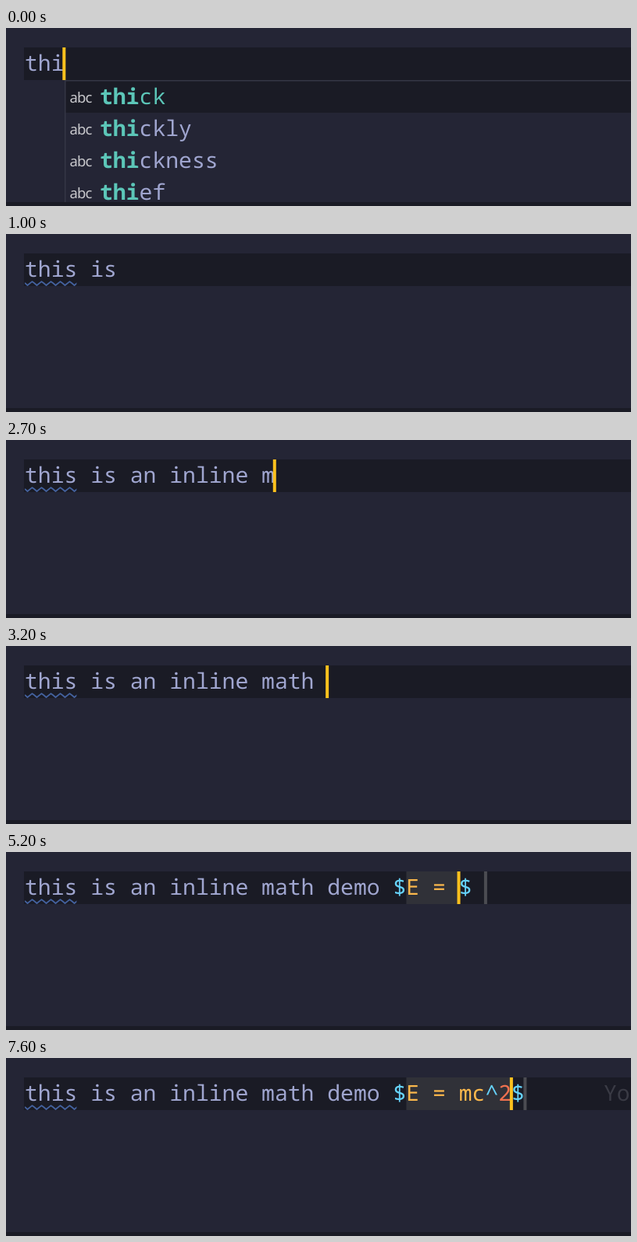
Write an HTML page with a canvas that moves like this. It is 800x229 px and loops after 7.7 s.

```html
<!DOCTYPE html>
<html lang="en">
<head>
<meta charset="utf-8">
<style>
  html, body { margin: 0; width: 100%; height: 100%; overflow: hidden; background: #242535; }
  canvas { display: block; }
</style>
</head>
<body>
<canvas id="stage" width="800" height="229"></canvas>
<script>
const ctx = document.getElementById('stage').getContext('2d');
const LOOP = 7700, LEFT = 24, CELL = 16.84, ROW = 41;
const MONO = '28.07px "Noto Sans Mono", monospace';
const COLORS = {
  back: '#242535', line: '#1a1b25', border: '#353746', text: '#a0a6d0', match: '#5cc6b8',
  icon: '#c8c8cc', cursor: '#fdc11d', squiggle: '#44629f', field: '#303138', stop: '#4b4c52',
  math: '#fbb84c', symbol: '#66d3fa', number: '#f0714f', hint: '#3a3b45'
};

// [time, prose typed so far]
const PROSE = [
  [0, 'thi'], [100, 'this'], [200, 'this '], [300, 'this i'], [400, 'this is'], [500, 'this is '],
  [1200, 'this is a'], [1400, 'this is an'], [1500, 'this is an '],
  [1700, 'this is an i'], [1900, 'this is an in'], [2000, 'this is an inl'],
  [2100, 'this is an inli'], [2200, 'this is an inline'], [2300, 'this is an inline '],
  [2700, 'this is an inline m'], [2900, 'this is an inline ma'], [3000, 'this is an inline mat'],
  [3100, 'this is an inline math'], [3200, 'this is an inline math '],
  [3300, 'this is an inline math d'], [3500, 'this is an inline math de'],
  [3600, 'this is an inline math dem'], [3700, 'this is an inline math demo'],
  [3800, 'this is an inline math demo '], [4100, 'this is an inline math demo m'],
  [4300, 'this is an inline math demo mk']
];
// [time, formula typed between the dollar signs]
const MATH = [
  [4400, ''], [4700, 'E'], [4900, 'E '], [5000, 'E ='], [5200, 'E = '], [5400, 'E = m'],
  [5600, 'E = mc'], [6000, 'E = mcs'], [6200, 'E = mcsr'], [6300, 'E = mc^2']
];
const SENTENCE = 'this is an inline math demo ';
const WORDS = ('thick thickly thickness thief this thistle thistledown thistles ' +
  'in incfig inability inaccessible inline inlined inlet inland is island isolate issue ' +
  'a an ability able analog analysis ancient ' +
  'macro machine magic mail math match material maths mathematics mathematical ' +
  'data day deal dear debate decade demo demon democracy demonstrate').split(' ');

const columnX = column => LEFT + column * CELL;
const current = (steps, time) => steps.filter(step => step[0] <= time).pop();

function rect(x, y, w, h, color) {
  ctx.fillStyle = color;
  ctx.fillRect(x, y, w, h);
}

function write(text, x, y, color, font = '500 ' + MONO) {
  ctx.font = font;
  ctx.fillStyle = color;
  ctx.fillText(text, x, y);
}

function squiggle() {
  const right = columnX(4) - 1;
  ctx.save();
  ctx.beginPath();
  ctx.rect(LEFT, 58, right - LEFT, 10);
  ctx.clip();
  ctx.beginPath();
  ctx.moveTo(LEFT, 63);
  for (let x = LEFT; x < right; x += 12) {
    ctx.lineTo(x + 3.5, 66);
    ctx.lineTo(x + 9.5, 61.2);
    ctx.lineTo(x + 12, 63);
  }
  ctx.strokeStyle = COLORS.squiggle;
  ctx.lineWidth = 1.7;
  ctx.lineJoin = 'round';
  ctx.stroke();
  ctx.restore();
}

function snippetIcon(x, y) {
  ctx.strokeStyle = COLORS.icon;
  ctx.lineWidth = 2;
  ctx.beginPath();
  ctx.moveTo(x, y + 22);
  ctx.lineTo(x, y);
  ctx.lineTo(x + 23, y);
  ctx.lineTo(x + 23, y + 22);
  ctx.stroke();
  for (let dot = -1; dot < 24; dot += 4) rect(x + dot, y + 24, 2, 2, COLORS.icon);
}

function suggestions(prefix, x) {
  rect(x, 67, 800 - x, 162, COLORS.back);
  rect(x, 68, 800 - x, ROW, COLORS.line);
  rect(x, 67, 800 - x, 1.5, COLORS.border);
  rect(x, 67, 1.5, 162, COLORS.border);
  WORDS.filter(word => word.startsWith(prefix)).slice(0, 4).forEach((word, i) => {
    const baseline = 98 + i * ROW, textX = x + 45;
    if (word === 'incfig') {
      snippetIcon(x + 10, baseline - 20);
    } else {
      ctx.letterSpacing = '-0.9px';
      write('abc', x + 6.5, baseline - 2, COLORS.icon, '18.5px "Noto Sans", sans-serif');
      ctx.letterSpacing = '0px';
    }
    write(prefix, textX, baseline, COLORS.match, 'bold ' + MONO);
    write(word.slice(prefix.length), textX + prefix.length * CELL, baseline,
      i ? COLORS.text : COLORS.match);
  });
}

function formula(content, time) {
  const start = SENTENCE.length + 1, end = start + content.length;
  const stop = end + (time < 6300 ? 2 : 1);
  rect(columnX(start), 25, content.length * CELL, 42, COLORS.field);
  rect(columnX(stop) - 1.5, 25, 4, 42, COLORS.stop);
  write('$', columnX(start - 1), 55, COLORS.symbol);
  [...content].forEach((char, i) => {
    const color = char === '^' ? COLORS.symbol : char === '2' ? COLORS.number : COLORS.math;
    write(char, columnX(start + i), 55, color);
  });
  write('$', columnX(end), 55, COLORS.symbol);
  if (time >= 7100) write('You, seconds ago', columnX(end + 7), 55, COLORS.hint);
  return end;
}

function draw(time) {
  rect(0, 0, 800, 229, COLORS.back);
  rect(23, 25, 777, 42, COLORS.line);
  const inMath = time >= MATH[0][0];
  const [typedAt, typed] = current(inMath ? MATH : PROSE, time);
  const prose = inMath ? SENTENCE : typed;
  write(prose, LEFT, 55, COLORS.text);
  if (time >= 700) squiggle();

  const column = inMath ? formula(typed, time) : prose.length;
  const word = prose.split(' ').pop();
  // The list opens slightly after the first letter of a word.
  if (time < 3800 && word && (word.length > 1 || time - typedAt >= 100)) {
    suggestions(word, columnX(column) + 0.5);
  }
  if (Math.floor((time - typedAt) / 500) % 2 === 0) {
    rect(columnX(column) - 2.2, 25, 4, 42, COLORS.cursor);
  }
  rect(0, 224, 800, 5, COLORS.line);
}

ctx.textRendering = 'geometricPrecision';
const began = performance.now();
function tick() {
  draw((performance.now() - began) % LOOP);
  requestAnimationFrame(tick);
}
tick();
</script>
</body>
</html>
```
